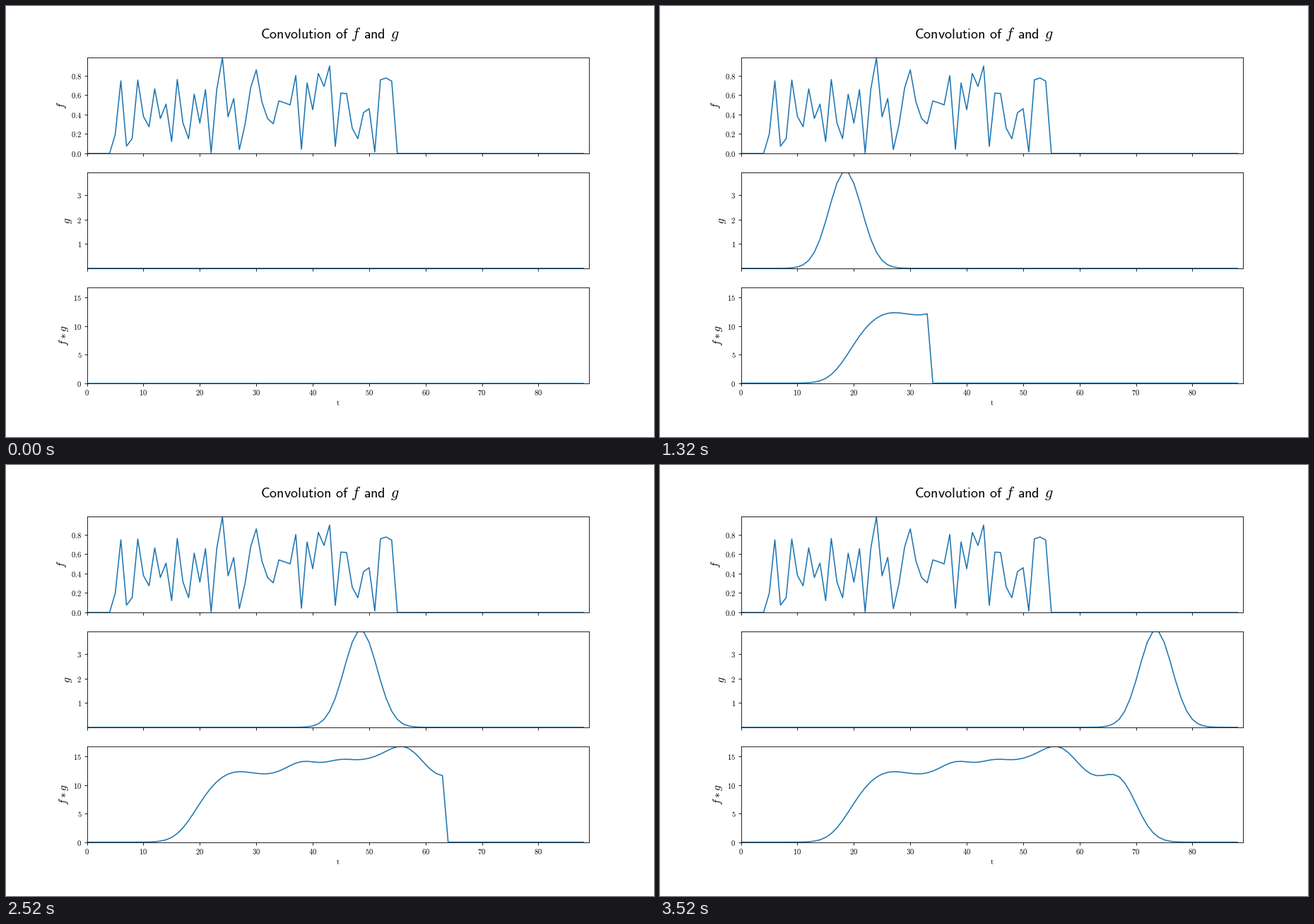
These frames come from a looping animation (917 px wide and 611 px high, 3.56 s). A matplotlib script:

```python
import numpy as np
import matplotlib.pyplot as plt
from matplotlib.animation import FuncAnimation

WIDTH, HEIGHT, DPI = 917, 611, 72
PT = 917 / 12 / DPI  # one typographic point of the layout, in pixels

plt.rcParams.update({
    "mathtext.fontset": "cm",
    "font.size": 10 * PT,
    "axes.linewidth": 0.8 * PT,
    "lines.linewidth": 1.5 * PT,
    "xtick.major.size": 3.5 * PT,
    "ytick.major.size": 3.5 * PT,
    "xtick.major.width": 0.8 * PT,
    "ytick.major.width": 0.8 * PT,
    "xtick.major.pad": 3.0 * PT,
    "ytick.major.pad": 3.5 * PT,
})

# A noisy signal with quiet margins, and a Gaussian kernel.
NOISE = [
    0.195, 0.748, 0.075, 0.152, 0.756, 0.381, 0.275, 0.665, 0.360, 0.508,
    0.122, 0.762, 0.315, 0.152, 0.610, 0.312, 0.657, 0.005, 0.660, 0.986,
    0.377, 0.566, 0.039, 0.297, 0.675, 0.861, 0.530, 0.360, 0.305, 0.541,
    0.522, 0.500, 0.803, 0.043, 0.726, 0.450, 0.824, 0.690, 0.900, 0.072,
    0.622, 0.617, 0.260, 0.152, 0.420, 0.461, 0.014, 0.758, 0.777, 0.745,
]
signal = np.pad(NOISE, 5)
kernel = 10 * np.exp(-np.linspace(-5, 5, 30) ** 2 / 2) / np.sqrt(2 * np.pi)
result = np.convolve(signal, kernel)
steps = len(result)
t = np.arange(steps)

fig, axes = plt.subplots(3, 1, sharex=True, dpi=DPI,
                         figsize=(WIDTH / DPI, HEIGHT / DPI))
fig.subplots_adjust(left=0.125, right=0.9, top=0.88, bottom=0.125, hspace=0.2)


def title_part(x, text, size):
    fig.text(x / WIDTH, 1 - 46 / HEIGHT, text, fontsize=size * PT,
             ha="left", va="baseline")


def setup(ax, label, limits, ticks, tick_format):
    ax.set_xlim(0, steps)
    ax.set_ylim(*limits)
    ax.set_yticks(ticks)
    ax.yaxis.set_major_formatter(tick_format)
    ax.set_ylabel(label, fontsize=14.6 * PT, labelpad=4 * PT)
    return ax.plot(t, np.zeros(steps), color="#1f77b4")[0]


title_part(359.5, r"$\mathsf{Convolution\hspace{0.38}of}$", 18.9)
title_part(487.5, "$f$", 20.7)
title_part(506.5, r"$\mathsf{and}$", 18.9)
title_part(544, "$g$", 20.7)

INTEGER = r"$\mathrm{{{x:.0f}}}$"
DECIMAL = r"$\mathrm{{{x:.1f}}}$"
signal_line = setup(axes[0], "$f$", (0, signal.max()),
                    [0, 0.2, 0.4, 0.6, 0.8], DECIMAL)
kernel_line = setup(axes[1], "$g$", (kernel.min(), kernel.max()),
                    [1, 2, 3], INTEGER)
result_line = setup(axes[2], "$f*g$", (0, result.max()),
                    [0, 5, 10, 15], INTEGER)
signal_line.set_ydata(np.pad(signal, (0, steps - len(signal))))

axes[2].set_xticks(range(0, 90, 10))
axes[2].xaxis.set_major_formatter(INTEGER)
axes[2].set_xlabel(r"$\mathrm{t}$", labelpad=3.4 * PT)


def update(n):
    # The kernel's last sample sits at n; the result is known up to n.
    offset = t - n + len(kernel) - 1
    inside = (offset >= 0) & (offset < len(kernel))
    shifted = np.where(inside, kernel[offset.clip(0, len(kernel) - 1)], 0)
    kernel_line.set_ydata(shifted)
    result_line.set_ydata(np.where(t <= n, result, 0))
    return kernel_line, result_line


anim = FuncAnimation(fig, update, frames=steps, interval=40, repeat=True,
                     repeat_delay=0, blit=False)
plt.show()
```
